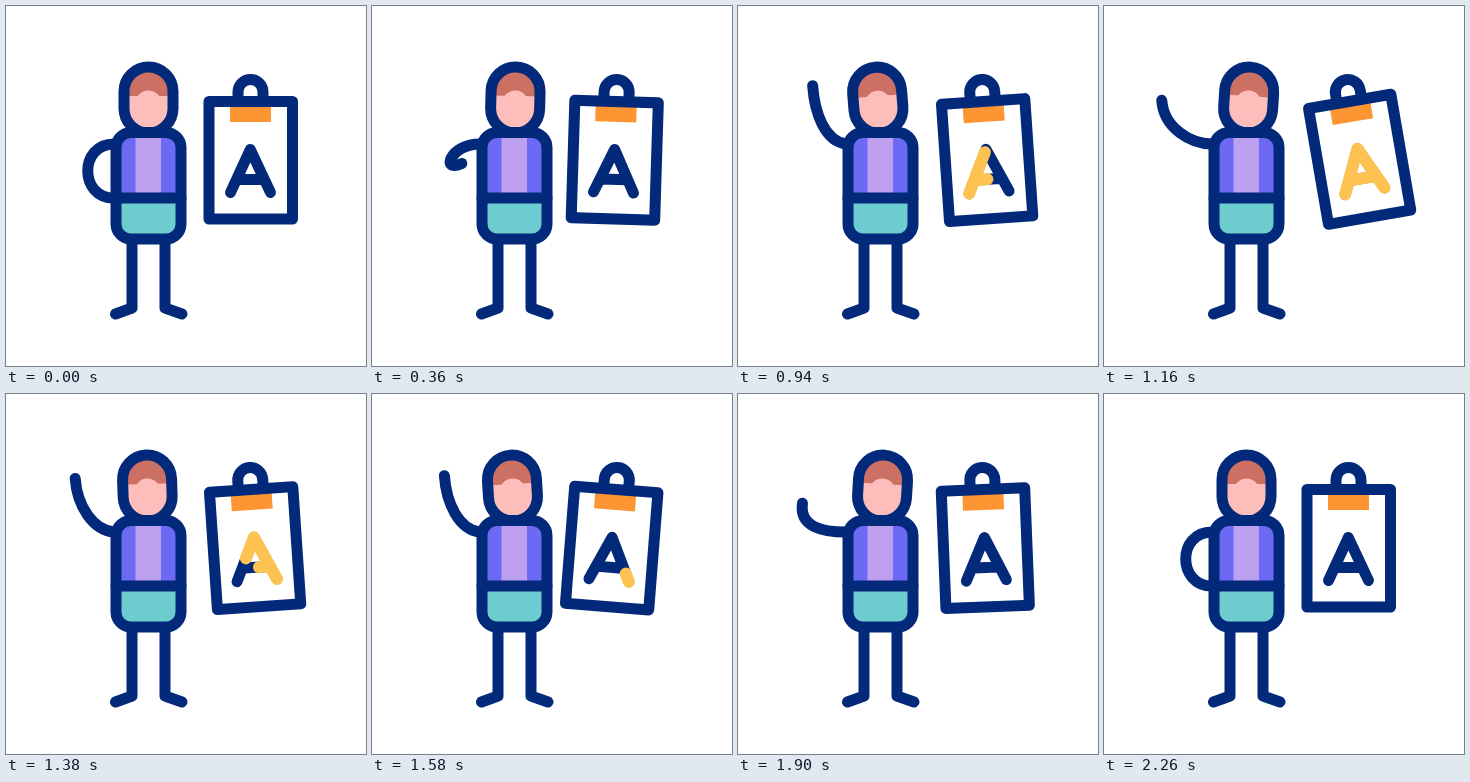
Recreate the animation shown at these times as an HTML page. Size 360x360 px, loop 2400 ms.

```html
<!DOCTYPE html>
<html lang="en">
<head>
<meta charset="utf-8">
<title>Waving figure with clipboard</title>
<style>
  html, body { margin: 0; width: 100%; height: 100%; overflow: hidden; background: #fff; }
  svg { display: block; width: 100%; height: 100%; }
  .line, .ink { fill: none; stroke: #03297a; stroke-width: 11; stroke-linecap: round; stroke-linejoin: round; }
  .ink { stroke: #fdc251; stroke-width: 12; }
</style>
</head>
<body>
<svg viewBox="0 0 360 360">
  <path id="arm" class="line"/>
  <g id="head">
    <rect x="118" y="61" width="49" height="66" rx="24.5" fill="#cb7063"/>
    <g fill="#fcbdbb">
      <path d="M118 90h49v12.500a24.500 24.500 0 0 1-49 0z"/>
      <circle cx="142.500" cy="97.500" r="13"/>
    </g>
    <rect class="line" x="118" y="61" width="49" height="66" rx="24.5"/>
  </g>
  <path class="line" d="M126 236V302L109.500 308M159 236V302L176 308"/>
  <rect x="110" y="126.500" width="65" height="106.500" rx="15" fill="#6c6af5"/>
  <path d="M129.500 127h25.500v65h-25.500z" fill="#bda0f0"/>
  <path d="M110 192h65v26a15 15 0 0 1-15 15h-35a15 15 0 0 1-15-15z" fill="#6dcccf"/>
  <rect class="line" x="110" y="126.500" width="65" height="106.500" rx="15"/>
  <path class="line" d="M110 192h65"/>
  <g id="board">
    <path class="line" d="M232 95V86a12.500 12.500 0 0 1 25 0V95"/>
    <path d="M224 100h41v16h-41z" fill="#fc9532"/>
    <path class="line" d="M203 95.500h83.500v117.500h-83.500z"/>
    <path class="line" d="M224.500 186.500L244.300 143.500L264.500 186.500M233 173.500H256"/>
    <path id="legs" class="ink" pathLength="100" d="M224.500 186.500L244.300 143.500L264.500 186.500"/>
    <path id="bar" class="ink" pathLength="100" d="M232 173.500H257"/>
  </g>
</svg>
<script>
const LOOP = 2400;
const $ = id => document.getElementById(id);
const mix = (a, b, u) => a + (b - a) * u;

// Eased 0 to 1 between two times
function ramp(t, from, to) {
  const u = Math.min(1, Math.max(0, (t - from) / (to - from)));
  return u * u * (3 - 2 * u);
}

function moveArm(raise, wave) {
  const x = mix(108, 57 + 18.5 * wave, raise);
  const y = mix(192, 95 - 16 * wave, raise);
  const bend = mix(-35, 2, raise);
  $('arm').setAttribute('d',
    `M108 138C${73 + 14 * raise} ${138 - 3 * wave} ${x + bend} ${y + 28 * raise} ${x} ${y}`);
}

function turn(id, angle, x, y) {
  $(id).setAttribute('transform', `rotate(${angle} ${x} ${y})`);
}

// Show the part of a stroke between two percentages of its length
function trim(id, start, end) {
  const style = $(id).style, length = end - start;
  style.display = length > 0.3 ? '' : 'none';
  style.strokeDasharray = `${length} 300`;
  style.strokeDashoffset = -start;
}

function render(t) {
  const raise = ramp(t, 200, 600) - ramp(t, 1790, 2250);
  const wave = t > 600 && t < 1800 ? (1 - Math.cos(Math.PI * t / 300)) / 2 : 0;
  moveArm(raise, wave);
  turn('head', raise * (4 - 9 * wave), 142.5, 128);

  const swing = 5 * ramp(t, 200, 600) - 15 * ramp(t, 600, 1205) + 14.6 * ramp(t, 1205, 1600)
    - 6.9 * ramp(t, 1600, 1880) + 2.3 * ramp(t, 1880, 2260);
  turn('board', swing, 244.5, 90);

  const drawn = 100 * ramp(t, 740, 1160);
  trim('legs', 100 * ramp(t, 1240, 1660), drawn);
  trim('bar', 100 * ramp(t, 1140, 1560), drawn);
}

const begin = performance.now();
function frame() {
  render((performance.now() - begin) % LOOP);
  requestAnimationFrame(frame);
}
frame();
</script>
</body>
</html>
```
